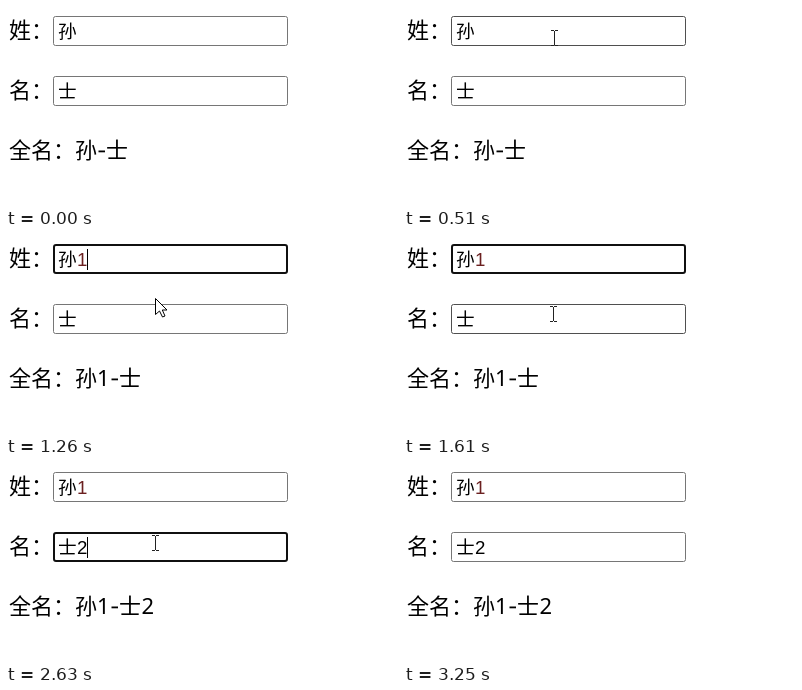
Write an HTML page with a canvas that moves like this. It is 392 by 200 pixels and loops after 3340 ms.

```html
<!DOCTYPE html>
<html lang="zh-CN">
<head>
<meta charset="utf-8">
<title>全名</title>
<style>
html, body { margin: 0; width: 100%; height: 100%; overflow: hidden; background: #fff; }
canvas { display: block; }
</style>
</head>
<body>
<canvas id="stage" width="392" height="200"></canvas>
<script>
const ctx = document.getElementById('stage').getContext('2d');
const LOOP = 3340;
const FAMILY = '孙', GIVEN = '士';
const BOX = { x: 47, w: 235, h: 30, first: 10, second: 70 };

const CJK = '"Noto Sans CJK SC", "Noto Sans CJK", sans-serif';
const LABEL = '300 22px ' + CJK;
const LABEL_LATIN = '22px "Noto Sans", "Open Sans", sans-serif';
const FIELD = '300 18.67px ' + CJK;
const FIELD_LATIN = '18.67px "Liberation Sans", Arial, sans-serif';

const TYPE_FIRST = 970, TYPE_SECOND = 2380;
const FOCUS_FIRST = 680, FOCUS_SECOND = 1780, BLUR = 3250;

const easeOut = p => 1 - (1 - p) ** 2;
const easeIn = p => p ** 1.6;
const smooth = p => p * p * (3 - 2 * p);
const between = (t, a, b) => t >= a && t < b;

// The pointer moves in sampled steps and rests between moves.
const moves = [
  { start: 40, end: 510, steps: 8, from: [162, 148], to: [150, 32], ease: easeOut },
  { start: 680, end: 770, steps: 1, from: [150, 36], to: [150, 34], ease: smooth },
  { start: 970, end: 1430, steps: 8, from: [150, 34], to: [149, 78], ease: smooth },
  { start: 1490, end: 1610, steps: 2, from: [149, 79], to: [149, 80], ease: smooth },
  { start: 2630, end: 2870, steps: 4, from: [149, 81], to: [199, 164], ease: easeIn }
];

function pointerAt(t) {
  if (!between(t, 40, 2930)) return null;
  const m = moves.filter(move => t >= move.start).pop();
  const raw = Math.min(1, (t - m.start) / (m.end - m.start));
  const p = m.ease(Math.floor(raw * m.steps + 1e-6) / m.steps);
  const [x, y] = m.from.map((v, i) => Math.round(v + (m.to[i] - v) * p));
  return { x, y };
}

function inside(p, top) {
  return p && p.x >= BOX.x && p.x < BOX.x + BOX.w && p.y >= top && p.y < top + BOX.h;
}

function text(str, x, y, font, color = '#000') {
  ctx.font = font;
  ctx.fillStyle = color;
  ctx.fillText(str, x, y);
}

function drawField(top, focused, hovered) {
  const line = focused ? 2 : 1;
  ctx.strokeStyle = focused ? '#101010' : hovered ? '#4f4f4f' : '#767676';
  ctx.lineWidth = line;
  ctx.beginPath();
  ctx.roundRect(BOX.x + line / 2, top + line / 2, BOX.w - line, BOX.h - line, 2);
  ctx.stroke();
}

function drawCaret(top, typed) {
  ctx.fillStyle = '#000';
  ctx.fillRect(typed ? 81 : 71, top + 5, 1, 21);
}

function drawFullName(first, second) {
  const y = 152;
  text('全名：', 3, y, LABEL);
  text(FAMILY, 69, y, LABEL);
  let x = 91;
  if (first) {
    text('1', x, y, LABEL_LATIN);
    x += 13;
  }
  ctx.fillStyle = '#000';
  ctx.fillRect(x + 1.5, y - 7.5, 6.5, 1.8);
  text(GIVEN, x + 9, y, LABEL);
  if (second) text('2', x + 31.5, y, LABEL_LATIN);
}

function drawBeam({ x, y }) {
  ctx.fillStyle = '#222';
  ctx.fillRect(x, y - 7, 1, 14);
  for (const row of [y - 8, y + 7]) {
    ctx.fillRect(x - 3, row, 3, 1);
    ctx.fillRect(x + 1, row, 3, 1);
  }
}

function drawArrow({ x, y }) {
  const outline = [[0, 0], [0, 16], [4, 12.5], [7, 18.5], [9.5, 17.5], [6.8, 11.5], [11.5, 11.5]];
  ctx.beginPath();
  outline.forEach(([dx, dy]) => ctx.lineTo(x + dx + 0.5, y + dy + 0.5));
  ctx.closePath();
  ctx.fillStyle = '#fff';
  ctx.strokeStyle = '#000';
  ctx.lineWidth = 1;
  ctx.fill();
  ctx.stroke();
}

function draw(t) {
  const pointer = pointerAt(t);
  const overFirst = inside(pointer, BOX.first);
  const overSecond = inside(pointer, BOX.second);
  const first = t >= TYPE_FIRST, second = t >= TYPE_SECOND;

  ctx.fillStyle = '#fff';
  ctx.fillRect(0, 0, 392, 200);

  text('姓：', 3, 32, LABEL);
  text('名：', 3, 92, LABEL);
  drawField(BOX.first, between(t, FOCUS_FIRST, FOCUS_SECOND), overFirst);
  drawField(BOX.second, between(t, FOCUS_SECOND, BLUR), overSecond);

  text(FAMILY, 52, 32, FIELD);
  if (first) text('1', 71, 32, FIELD_LATIN, '#6b2020');
  text(GIVEN, 52, 92, FIELD);
  if (second) text('2', 71, 92, FIELD_LATIN);

  if (between(t, FOCUS_FIRST, 1490)) drawCaret(BOX.first, first);
  if (between(t, FOCUS_SECOND, 2230) || between(t, TYPE_SECOND, 2870)) {
    drawCaret(BOX.second, second);
  }

  drawFullName(first, second);
  if (pointer) (overFirst || overSecond ? drawBeam : drawArrow)(pointer);
}

function tick() {
  draw(performance.now() % LOOP);
  requestAnimationFrame(tick);
}
tick();
</script>
</body>
</html>
```
